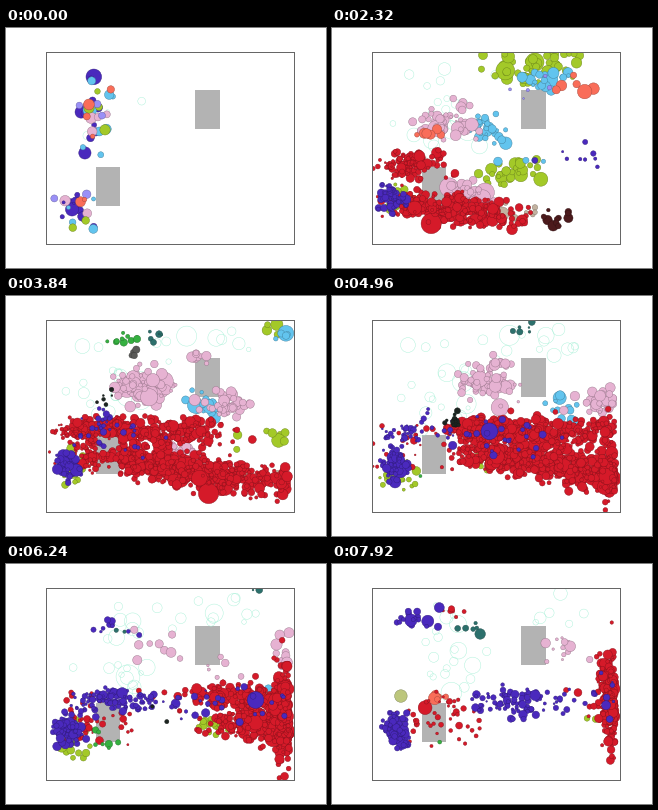
A matplotlib script for the animation above (8 s loop, 320 px wide and 240 px high).

```python
import numpy as np
import matplotlib.pyplot as plt
from matplotlib.animation import FuncAnimation
from matplotlib.colors import to_rgb
from matplotlib.patches import Rectangle

FRAMES, INTERVAL, DPI = 100, 80, 100
LEFT, RIGHT, TOP, BOTTOM = 40, 288, 24, 216
WIDTH, HEIGHT = RIGHT - LEFT, BOTTOM - TOP

RED, PINK, LIME, SKY = "#d51a29", "#e6b2d2", "#a3c928", "#62c4ee"
INDIGO, CORAL, BROWN, TAN = "#4a29bd", "#f96d59", "#4c1a1c", "#c2b2a0"
LILAC, GREEN, TEAL, GREY = "#9a90f6", "#35b040", "#2c706c", "#5a5a58"
MINT, OLIVE, BLACK = "#a4f0d6", "#bcc67c", "#1c2420"

rng = np.random.default_rng(11)


def scatter_points(n, spread):
    return np.clip(rng.normal(0, 1, (n, 2)), -2.2, 2.2) * spread


class Tribe:
    """Agents born round a source that moves with `flow`, then carried by `speed`.

    Those that reach the right-hand side pile up there and spread along it.
    """

    def __init__(self, color, n, birth, origin, spread, speed=(0, 0), flow=None,
                 life=(20, 45), radius=2.8, rush=1.0, hollow=False):
        flow = speed if flow is None else flow
        self.birth = birth[0] + (birth[1] - birth[0]) * rng.uniform(0, 1, n) ** rush
        self.death = self.birth + rng.uniform(*life, n)
        since = (self.birth - birth[0])[:, None]
        self.home = np.array(origin) + since * flow + scatter_points(n, spread)
        self.speed = np.array(speed) * rng.normal(1, 0.12, (n, 1)) + scatter_points(n, 0.12)
        self.stop = RIGHT - 5 - np.abs(rng.normal(0, 7, n))
        self.rise = rng.normal(-0.8, 0.9, n)
        self.radius = radius * np.exp(rng.normal(-0.05, 0.38, n))
        self.phase = rng.uniform(0, 2 * np.pi, n)
        self.bold = rng.uniform(0, 1, n) < 0.25
        rgb = np.array(to_rgb(color))
        self.face = np.append(rgb, 0 if hollow else 1)
        self.edge = np.append(rgb if hollow else rgb * 0.65, 1)

    def at(self, frame):
        age = frame - self.birth
        x, y = (self.home + self.speed * age[:, None]).T
        wait = np.maximum(0, x - self.stop) / np.maximum(1, self.speed[:, 0])
        y = y + self.rise * wait + 1.5 * np.sin(frame / 4 + self.phase)
        x = np.clip(x, LEFT + 1, self.stop)
        y = np.clip(y, TOP + 2, BOTTOM - 2)
        seen = (age >= 0) & (frame < self.death)
        for wx, wy, w, h in walls:
            inside = (x > wx) & (x < wx + w) & (y > wy) & (y < wy + h)
            seen &= ~inside | self.bold
        size = self.radius * np.clip(0.6 + age / 16, 0, 1)
        return np.column_stack([x, y])[seen], size[seen]


walls = [(LEFT + a * WIDTH, TOP + b * HEIGHT, 0.1 * WIDTH, 0.2 * HEIGHT)
         for a, b in [(0.6, 0.2), (0.2, 0.6)]]

tribes = [
    Tribe(MINT, 75, (-8, 98), (106, 88), (22, 30), flow=(0.1, 0.1),
          radius=5, rush=0.7, hollow=True),
    Tribe(MINT, 20, (20, 98), (200, 46), (24, 9), flow=(0.3, 0),
          radius=5, hollow=True),
]

# mixed founders in an upper and a lower column
founders = [INDIGO] * 3 + [SKY] * 2 + [PINK, LIME, LILAC, CORAL]
for color in founders:
    early = dict(birth=(-10, -6), speed=(1.2, 0), flow=(0, 0), life=(13, 20), radius=4.3)
    tribes.append(Tribe(color, 4, origin=(76, 88), spread=(9, 21), **early))
    tribes.append(Tribe(color, 2, origin=(62, 182), spread=(13, 11), **early))

tribes += [
    # sky and lime travellers
    Tribe(LIME, 55, (0, 12), (80, 45), (12, 7), (4.9, -0.3), flow=(0.6, 0), radius=4),
    Tribe(LIME, 110, (0, 78), (66, 168), (8, 9), flow=(0, 0.1), life=(10, 25), radius=3.3),
    Tribe(LIME, 32, (2, 16), (68, 152), (10, 6), (4.6, -0.3), flow=(2, 0), radius=3.8),
    Tribe(LIME, 20, (44, 62), (90, 167), (9, 4), (3.4, -0.2), radius=2.8),
    Tribe(SKY, 50, (0, 50), (90, 92), (6, 7), (2.3, 0.3), life=(15, 40), radius=3.4),
    Tribe(SKY, 22, (0, 16), (82, 64), (8, 5), (4.5, -0.4), radius=3.2),
    Tribe(SKY, 7, (3, 10), (79, 123), (6, 2), (5, 0.3), flow=(0, 0), radius=3.6),
    # pink colonies
    Tribe(PINK, 180, (0, 55), (80, 95), (14, 9), (1.2, -0.1), life=(18, 32),
          radius=3.7, rush=0.8),
    Tribe(PINK, 105, (3, 48), (94, 178), (11, 7), (1.7, -0.4), life=(14, 30), radius=4),
    Tribe(PINK, 50, (30, 46), (160, 110), (12, 6), (3.4, -0.1), radius=3.3),
    Tribe(PINK, 12, (38, 48), (210, 56), (8, 6), (-2, 0.5), radius=3.3),
    Tribe(PINK, 16, (60, 95), (196, 112), (10, 6), (0.9, -0.7), radius=2.5),
    # small groups
    Tribe(CORAL, 6, (2, 8), (90, 78), (6, 4), (6, -0.8), radius=3.4, life=(25, 32)),
    Tribe(CORAL, 14, (2, 18), (82, 98), (9, 5), (0.7, 0.3), life=(15, 25), radius=3.3),
    Tribe(CORAL, 8, (85, 95), (108, 132), (5, 3), radius=3.6),
    Tribe(LILAC, 8, (2, 10), (78, 72), (12, 6), (5, -0.5), life=(22, 32), radius=2),
    Tribe(BROWN, 14, (3, 7), (82, 193), (5, 2), (5.3, -0.1), life=(22, 34), radius=3.1),
    Tribe(TAN, 14, (4, 8), (75, 191), (9, 4), (4.3, -0.2), life=(30, 55), radius=2.8),
    Tribe(GREEN, 10, (36, 46), (118, 44), (9, 4), radius=2.6, life=(12, 18)),
    Tribe(GREY, 4, (40, 46), (128, 56), (2, 2), radius=3, life=(12, 18)),
    Tribe(TEAL, 6, (40, 48), (122, 44), (7, 4), (3, -0.6), radius=2.2),
    Tribe(TEAL, 8, (68, 95), (104, 72), (9, 5), (1, -0.2), radius=2),
    # two red streams and their stragglers
    Tribe(RED, 850, (7, 50), (62, 190), (13, 7), (5.4, 0), flow=(0.4, -0.8),
          life=(28, 72), rush=0.72),
    Tribe(RED, 480, (20, 49), (54, 137), (9, 6), (5, 0), flow=(0.3, -0.1), life=(28, 80)),
    Tribe(RED, 130, (46, 95), (66, 155), (20, 13), (0.8, 0), life=(12, 40), radius=2),
    Tribe(RED, 7, (85, 95), (118, 46), (8, 2), radius=2.2),
    # indigo nest, travellers and outposts
    Tribe(INDIGO, 330, (-6, 99), (60, 171), (6, 8), flow=(0.03, -0.05),
          life=(12, 34), radius=2.6, rush=0.75),
    Tribe(INDIGO, 20, (2, 8), (100, 128), (8, 7), (5.2, 0.1), life=(16, 34), radius=3),
    Tribe(INDIGO, 24, (30, 46), (96, 134), (5, 12), life=(14, 26), radius=2.5),
    Tribe(INDIGO, 45, (38, 66), (95, 142), (20, 9), (4.8, 0), flow=(0, 0),
          life=(20, 55), radius=2.2),
    Tribe(INDIGO, 130, (54, 78), (50, 138), (10, 6), (3.9, 0), flow=(1.2, 0),
          life=(25, 55), radius=2.3),
    Tribe(INDIGO, 20, (68, 90), (116, 68), (13, 5), (-1.1, -0.4), radius=2.8),
    # late arrivals
    Tribe(GREEN, 18, (56, 85), (100, 174), (6, 5), radius=2.5, life=(10, 25)),
    Tribe(BLACK, 13, (42, 58), (88, 92), (4, 4), (1.8, 1.6), radius=2.1, life=(12, 22)),
    Tribe(OLIVE, 1, (86, 88), (69, 131), (0, 0), radius=8.5),
]

fig = plt.figure(figsize=(3.2, 2.4), dpi=DPI, facecolor="white")
ax = fig.add_axes([0.125, 0.1, 0.775, 0.8])
ax.set(xlim=(LEFT, RIGHT), ylim=(BOTTOM, TOP), xticks=[], yticks=[])
for spine in ax.spines.values():
    spine.set(linewidth=0.72, edgecolor="0.4")
for x, y, w, h in walls:
    ax.add_patch(Rectangle((x, y), w, h, color="#b3b3b3", lw=0))
dots = ax.scatter([], [], linewidths=0.3, zorder=2)


def update(frame):
    spots = [tribe.at(frame) for tribe in tribes]
    counts = [len(radii) for _, radii in spots]
    radii = np.concatenate([r for _, r in spots])
    dots.set_offsets(np.concatenate([p for p, _ in spots]))
    dots.set_sizes((2 * radii * 72 / DPI) ** 2)
    dots.set_facecolors(np.repeat([t.face for t in tribes], counts, axis=0))
    dots.set_edgecolors(np.repeat([t.edge for t in tribes], counts, axis=0))
    return (dots,)


anim = FuncAnimation(fig, update, frames=FRAMES, interval=INTERVAL,
                     repeat=True, repeat_delay=0)
plt.show()
```
